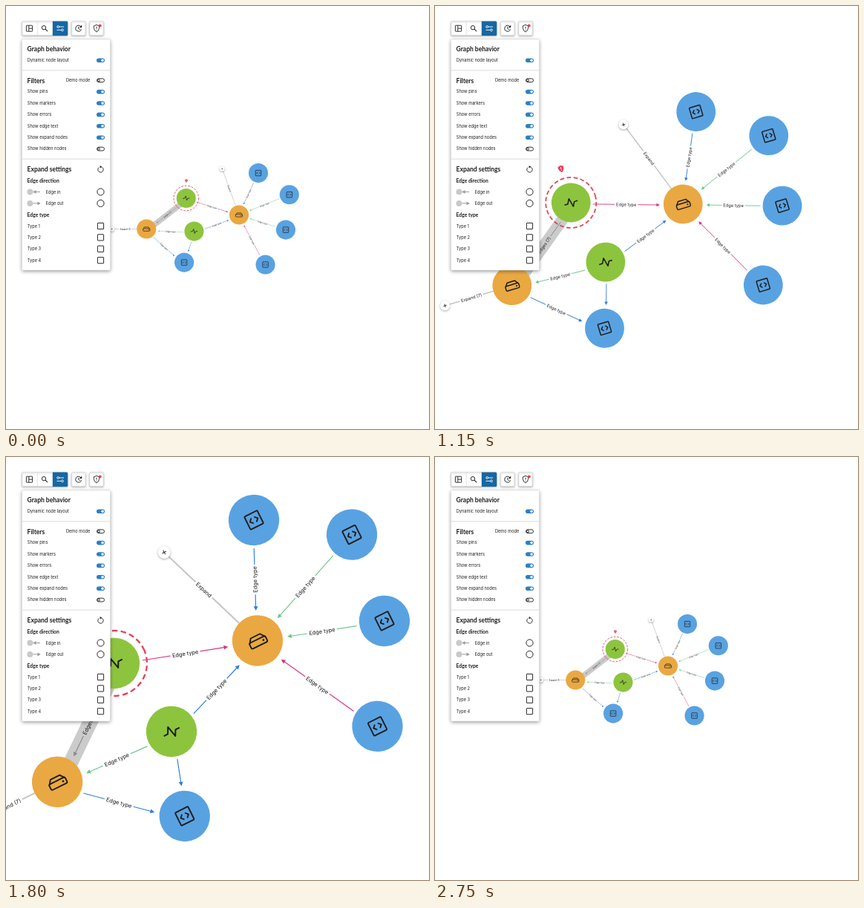
Recreate the animation shown at these times as an HTML page with a canvas. Size 570 px wide and 570 px high, loop 3550 ms.

```html
<!DOCTYPE html>
<html lang="en">
<head>
<meta charset="utf-8">
<title>Graph behavior</title>
<style>
html, body { margin: 0; width: 100%; height: 100%; overflow: hidden; background: #fff; }
canvas { display: block; width: 570px; height: 570px; }
</style>
</head>
<body>
<canvas id="stage"></canvas>
<script>
const SIZE = 570, LOOP = 3550, STEP = 50;
const ZOOM = 2.617, TURN = -26.5 * Math.PI / 180;
const canvas = document.getElementById('stage');
const ctx = canvas.getContext('2d');
const dpr = window.devicePixelRatio || 1;
canvas.width = canvas.height = SIZE * dpr;

const INK = '#1d1d1d', BLUE = '#2f7ddb', GREEN = '#6cc787', PINK = '#d8347f', GRAY = '#c6c6c6', BAND = '#cbcbcb';
const FILL = { drive: '#eaa842', pulse: '#8dc43e', code: '#59a2e1' };

// Graph space: centred on the group, at full zoom, not turned.
const nodes = {
  o1: [-205, 43.3, 'drive'], o2: [121.4, -6.6, 'drive'],
  g1: [-64.9, -65.4, 'pulse'], g2: [-37, 51.3, 'pulse'],
  b0: [-72, 161.2, 'code'], b1: [189.5, -154.2, 'code'], b2: [298.9, -77.8, 'code'],
  b3: [286.3, 46, 'code'], b4: [214.5, 168.8, 'code']
};
const plus = [[62, -169.2, 'o2', 'Expand'], [-327, 43.2, 'o1', 'Expand (7)']];
// from, to, sideways shift (below the label is positive), colour, label
const edges = [
  ['b1', 'o2', -1, BLUE], ['b2', 'o2', 0, GREEN], ['b3', 'o2', 0.8, GREEN],
  ['b4', 'o2', 2, PINK], ['g1', 'o2', 2, PINK], ['g2', 'o2', 5, BLUE],
  ['g2', 'o1', 5, GREEN], ['o1', 'b0', 5.5, BLUE], ['g2', 'b0', 2, BLUE, ''],
  ['g1', 'o1', 5, '#8b8b8b', 'Edges (7)', BAND]
];

function line(points, color, width) {
  ctx.beginPath();
  points.forEach(([x, y], i) => i ? ctx.lineTo(x, y) : ctx.moveTo(x, y));
  ctx.strokeStyle = color;
  ctx.lineWidth = width;
  ctx.stroke();
}
function shape(points, color) {
  ctx.beginPath();
  points.forEach(([x, y]) => ctx.lineTo(x, y));
  ctx.fillStyle = color;
  ctx.fill();
}
function paint(fill, stroke, width = 1) {
  if (fill) { ctx.fillStyle = fill; ctx.fill(); }
  if (stroke) { ctx.strokeStyle = stroke; ctx.lineWidth = width; ctx.stroke(); }
}
function disc(x, y, r, fill, stroke, width) {
  ctx.beginPath();
  ctx.arc(x, y, r, 0, 7);
  paint(fill, stroke, width);
}
function ring(x, y, r, color, width) {
  ctx.beginPath();
  ctx.arc(x, y, r, 0, 2 * Math.PI);
  paint(null, color, width);
}
function box(x, y, w, h, r, fill, stroke, width) {
  ctx.beginPath();
  ctx.roundRect(x, y, w, h, r);
  paint(fill, stroke, width);
}
function shadowed(alpha, blur, dy, draw) {
  ctx.save();
  ctx.shadowColor = `rgba(0,0,0,${alpha})`;
  ctx.shadowBlur = blur * dpr;
  ctx.shadowOffsetY = dy * dpr;
  draw();
  ctx.restore();
}
function text(str, x, y, font, align = 'left', color = INK) {
  ctx.font = font;
  ctx.textAlign = align;
  ctx.fillStyle = color;
  ctx.fillText(str, x, y);
}
function at(x, y, draw, angle = 0) {
  ctx.save();
  ctx.translate(x, y);
  ctx.rotate(angle);
  draw();
  ctx.restore();
}

const icons = {
  code() {
    box(-9.7, -9.7, 19.4, 19.4, 1.2, null, INK, 1.9);
    line([[-2.2, -3.8], [-5.8, 0], [-2.2, 3.8]], INK, 1.9);
    line([[2.2, -3.8], [5.8, 0], [2.2, 3.8]], INK, 1.9);
  },
  drive() {
    box(-12, -1.6, 24, 8.6, 2, null, INK, 1.9);
    line([[-11.4, -0.6], [-7, -6.8], [7, -6.8], [11.4, -0.6]], INK, 1.9);
    disc(7.5, 2.7, 1.4, INK);
  },
  pulse() {
    line([[-12, 0.8], [-6, 0.8], [-1.6, -7.6], [2, 7.6], [6, 0], [12, 0]], INK, 2);
  }
};

// Places both ends outside the nodes and gives the length and angle.
function span([x1, y1], [x2, y2], gapA, gapB, shift = 0) {
  const a = Math.atan2(y2 - y1, x2 - x1), c = Math.cos(a), s = Math.sin(a);
  const flip = c < 0, side = flip ? -shift : shift;
  const ax = x1 + c * gapA - s * side, ay = y1 + s * gapA + c * side;
  const bx = x2 - c * gapB - s * side, by = y2 - s * gapB + c * side;
  return { a, flip, ax, ay, bx, by, len: Math.hypot(bx - ax, by - ay) };
}
function label(e, str, back) {
  at((e.ax + e.bx) / 2, (e.ay + e.by) / 2, () => {
    ctx.font = '7.4px Inter, sans-serif';
    const w = ctx.measureText(str).width + 5;
    ctx.fillStyle = back;
    ctx.fillRect(-w / 2, -5, w, 10);
    text(str, 0, 2.7, ctx.font, 'center');
  }, e.a + (e.flip ? Math.PI : 0));
}
function edge([from, to, shift, color, str = 'Edge type', back = '#fff']) {
  const e = span(nodes[from], nodes[to], 38, 40.5, shift);
  at(e.ax, e.ay, () => {
    if (back === BAND) line([[-38, 0], [e.len + 40, 0]], BAND, 20);
    line([[0, 0], [e.len - 4, 0]], color, 1.15);
    shape([[e.len, 0], [e.len - 5.8, -2.9], [e.len - 5.8, 2.9]], color);
  }, e.a);
  if (str) label(e, str, back);
}
function expander([x, y, owner, str]) {
  const e = span([x, y], nodes[owner], 8, 34);
  line([[e.ax, e.ay], [e.bx, e.by]], GRAY, 2);
  label(e, str, '#fff');
  shadowed(0.35, 3, 1, () => disc(x, y, 8.4, '#fff'));
  line([[x - 3, y], [x + 3, y]], INK, 1);
  line([[x, y - 3], [x, y + 3]], INK, 1);
}
function marker(x, y) {
  at(x, y, () => {
    ctx.beginPath();
    ctx.moveTo(0, -6);
    ctx.lineTo(5, -4);
    ctx.quadraticCurveTo(5.4, 3, 0, 6.5);
    ctx.quadraticCurveTo(-5.4, 3, -5, -4);
    ctx.closePath();
    paint('#e8435f');
    line([[0, -3], [0, 1]], '#fff', 1.2);
    disc(0, 3, 0.7, '#fff');
  });
}

function graph(p) {
  const k = (1 + (ZOOM - 1) * p) / ZOOM;
  ctx.save();
  ctx.translate(267.6 - 34.35 * p, 284 + 23.55 * p);
  ctx.rotate(TURN * p);
  ctx.scale(k, k);
  edges.forEach(edge);
  plus.forEach(expander);
  const [gx, gy] = nodes.g1;
  ctx.setLineDash([7.4, 4.4]);
  ring(gx, gy, 44, '#e5405a', 2.3);
  ctx.setLineDash([]);
  for (const [x, y, kind] of Object.values(nodes)) {
    disc(x, y, 34.2, FILL[kind]);
    at(x, y, icons[kind]);
  }
  marker(gx + 0.5, gy - 61.5);
  ctx.restore();
}

const BODY = '5.65px Inter, sans-serif';
const HEAD = 'bold 8.5px Lato, sans-serif';
const SUB = 'bold 6.75px Lato, sans-serif';

function toggle(y, on) {
  if (on) {
    box(122, y - 2.8, 11, 5.6, 2.8, '#2e7fc2');
    disc(130.1, y, 1.8, '#fff');
  } else {
    box(122.5, y - 2.4, 10, 4.8, 2.4, '#fff', INK, 0.9);
    disc(125, y, 1.5, null, INK, 0.9);
  }
}
function spin(x, y, r) {
  ctx.beginPath();
  ctx.arc(x, y, r, -1, 4.1);
  paint(null, INK, 0.9);
  shape([[x - 0.8, y - r - 1.8], [x + 2, y - r + 0.1], [x - 0.8, y - r + 1.8]], INK);
}

function toolbar() {
  const frame = (x, w) => shadowed(0.3, 2.5, 0.8, () => box(x, 20.8, w, 18.8, 1.5, '#fff', '#d2d2d2', 0.6));
  frame(21.5, 61.5);
  frame(88.3, 19);
  frame(112.5, 19);
  line([[42.3, 21], [42.3, 39.5]], '#d2d2d2', 0.6);
  box(62.8, 20.5, 20.4, 19.4, [0, 1.5, 1.5, 0], '#1767a2');

  box(27.4, 26.2, 8.2, 8, 0.5, null, INK, 0.9);
  line([[30.8, 26.2], [30.8, 34.2]], INK, 0.9);
  line([[30.8, 30.2], [35.6, 30.2]], INK, 0.9);

  disc(51, 29.2, 2.7, null, INK, 0.95);
  line([[53, 31.2], [56, 34.2]], INK, 1.1);

  line([[71.7, 28], [78, 28]], '#fff', 0.9);
  line([[68.5, 32.4], [74.5, 32.4]], '#fff', 0.9);
  disc(70.2, 28, 1.4, null, '#fff', 0.9);
  disc(76, 32.4, 1.4, null, '#fff', 0.9);

  ctx.beginPath();
  ctx.arc(97.8, 30.2, 3.9, 0.3, 5.5);
  paint(null, INK, 0.95);
  shape([[102.2, 25.6], [102.2, 29], [98.8, 29]], INK);
  line([[97.8, 28], [97.8, 30.5], [99.7, 31.6]], INK, 0.9);

  ctx.beginPath();
  ctx.moveTo(122, 25.4);
  ctx.lineTo(125.6, 26.8);
  ctx.quadraticCurveTo(126, 33, 122, 35);
  ctx.quadraticCurveTo(118, 33, 118.4, 26.8);
  ctx.closePath();
  paint(null, INK, 0.9);
  line([[122, 27.8], [122, 30.6]], INK, 0.9);
  disc(122, 32.2, 0.55, INK);
  disc(126.7, 26.5, 2, '#e5405a');
}

function panel() {
  shadowed(0.42, 5, 1.5, () => box(21.5, 45, 119, 311, 1, '#fff'));
  box(21.5, 45, 119, 311, 1, null, '#d6d6d6', 0.5);
  for (const y of [86.8, 206.2]) line([[22, y], [140.3, y]], '#d9d9d9', 0.9);
  text('Graph behavior', 28.6, 61.4, HEAD);
  text('Filters', 28.6, 103.6, HEAD);
  text('Expand settings', 28.6, 222.9, HEAD);
  text('Edge direction', 28.6, 237.6, SUB);
  text('Edge type', 28.6, 283.5, SUB);

  const row = (str, y, x = 28.8) => text(str, x, y + 2.05, BODY);
  row('Dynamic node layout', 73);
  toggle(73.2, true);
  row('Demo mode', 100, 81);
  toggle(100.2, false);
  ['pins', 'markers', 'errors', 'edge text', 'expand nodes', 'hidden nodes'].forEach((s, i) => {
    const y = 115.4 + i * 15.4;
    row('Show ' + s, y);
    toggle(y + 0.2, i < 5);
  });
  spin(127.5, 220.4, 3.7);

  ['Edge in', 'Edge out'].forEach((s, i) => {
    const y = 250.5 + i * 15.4, tip = i ? 46.5 : 36.5, back = i ? -4 : 4;
    disc(32.4, y, 4, '#c9c9c9');
    line([[36.4, y], [46, y]], '#9a9a9a', 1);
    shape([[tip, y], [tip + back, y - 2.5], [tip + back, y + 2.5]], '#9a9a9a');
    row(s, y, 53.7);
    disc(127.5, y, 4.6, '#fff', INK, 0.95);
  });
  for (let i = 0; i < 4; i++) {
    const y = 296.5 + i * 15.4;
    row('Type ' + (i + 1), y);
    box(123.4, y - 4.1, 8.2, 8.2, 0.4, '#fff', INK, 0.95);
  }
}

// Cubic ease-in-out with handles at .42 and .58.
function ease(x) {
  if (x <= 0) return 0;
  if (x >= 1) return 1;
  let lo = 0, hi = 1, s = 0.5;
  for (let i = 0; i < 24; i++) {
    s = (lo + hi) / 2;
    const bx = 1.26 * s * (1 - s) ** 2 + 1.74 * s * s * (1 - s) + s ** 3;
    if (bx < x) lo = s; else hi = s;
  }
  return s * s * (3 - 2 * s);
}
function progress(t) {
  if (t < 1050) return 0;
  if (t < 2200) return ease((t - 965) / 320);
  return 1 - ease((t - 2181) / 322);
}

function draw(now) {
  const t = Math.floor((now % LOOP) / STEP) * STEP;
  ctx.setTransform(dpr, 0, 0, dpr, 0, 0);
  ctx.fillStyle = '#fff';
  ctx.fillRect(0, 0, SIZE, SIZE);
  ctx.lineJoin = 'round';
  graph(progress(t));
  toolbar();
  panel();
}
const start = performance.now();
function tick() {
  draw(performance.now() - start);
  requestAnimationFrame(tick);
}
tick();
</script>
</body>
</html>
```
